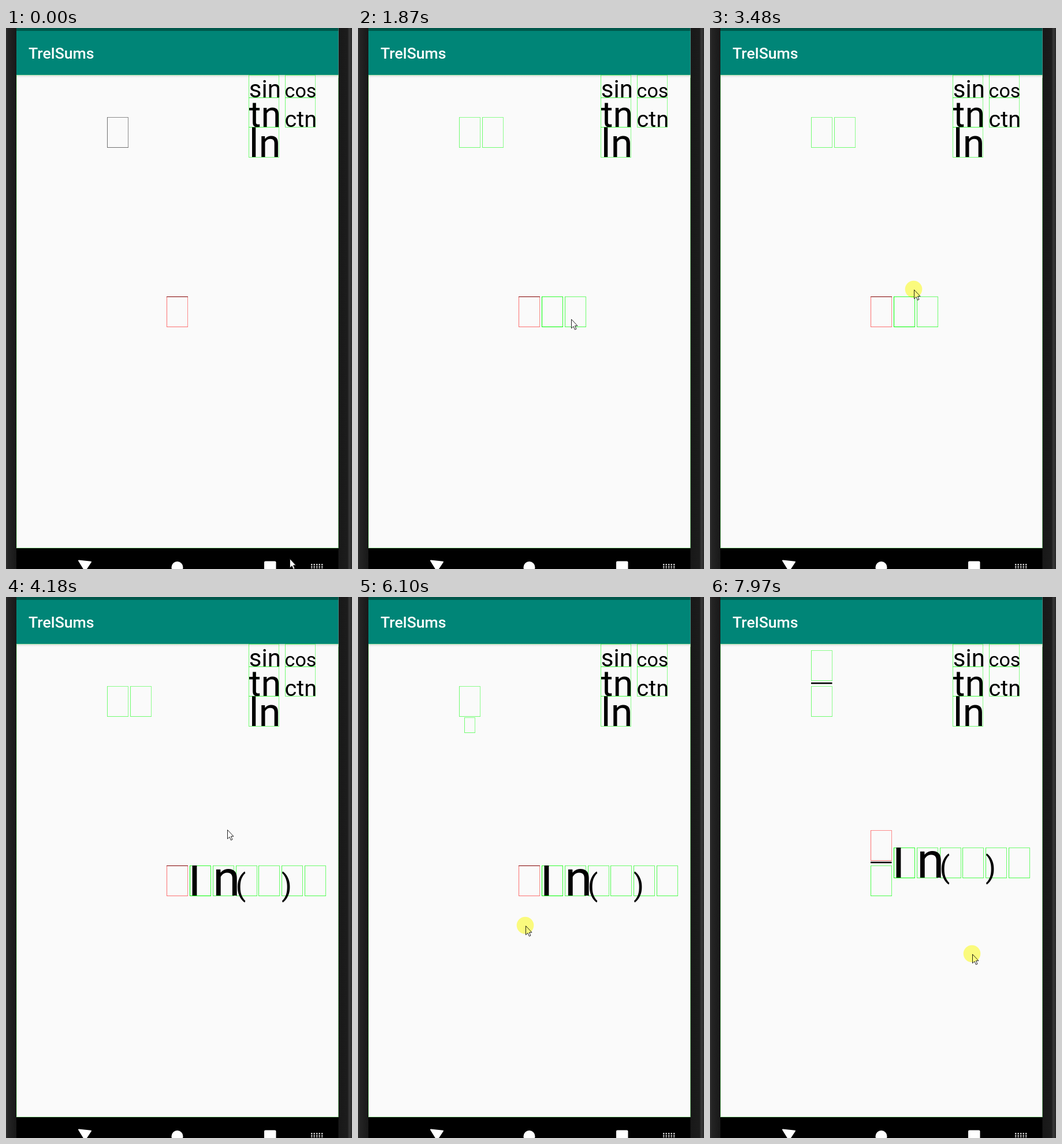
An HTML page that plays this animation: 599x935 px, repeating every 8 s.

```html
<!DOCTYPE html>
<html lang="en">
<head>
<meta charset="utf-8">
<title>TrelSums</title>
<style>
  html, body { margin: 0; width: 100%; height: 100%; overflow: hidden; background: #1a1a1a; }
  svg { display: block; width: 599px; height: 935px; font-family: Roboto, sans-serif; }
  #halo { fill: #ffff80; mix-blend-mode: multiply; }
</style>
</head>
<body>
<svg viewBox="0 0 599 935">
  <defs>
    <linearGradient id="left" x2="1" y2="0">
      <stop offset="0" stop-color="#303030"/><stop offset=".2" stop-color="#242424"/>
      <stop offset="1" stop-color="#181818"/>
    </linearGradient>
    <linearGradient id="right" x2="1" y2="0">
      <stop offset="0" stop-color="#181818"/><stop offset=".68" stop-color="#1c1c1c"/>
      <stop offset=".8" stop-color="#383838"/><stop offset="1" stop-color="#282828"/>
    </linearGradient>
    <linearGradient id="shade" x2="0" y2="1">
      <stop offset="0" stop-color="#d9d9d9"/><stop offset="1" stop-color="#fafafa"/>
    </linearGradient>
    <clipPath id="cell"><rect x="318" y="464" width="38" height="53"/></clipPath>
  </defs>

  <!-- phone -->
  <rect width="18" height="935" fill="url(#left)"/>
  <rect x="575" width="24" height="935" fill="url(#right)"/>
  <rect x="18" width="557.5" height="899" fill="#fafafa"/>
  <rect x="18" width="557.5" height="5" fill="#00574b"/>
  <rect x="18" y="5" width="557.5" height="76" fill="#008577"/>
  <rect x="18" y="81" width="557.5" height="5" fill="url(#shade)"/>
  <text x="39" y="53" font-size="26.7" font-weight="500" fill="#fff">TrelSums</text>
  <rect x="18" y="899" width="557.5" height="36" fill="#000"/>
  <g fill="#fff">
    <path d="M126 920.5L147 922.8L136.8 938Z" stroke="#fff" stroke-width="2" stroke-linejoin="round"/>
    <circle cx="296.5" cy="932" r="10"/>
    <rect x="447" y="921.5" width="20.5" height="20" rx="2"/>
    <path d="M528 927.5h21M528 931.5h21M528 935.5h21" stroke="#ddd" stroke-width="2.4" stroke-dasharray="2.4 2.1"/>
  </g>

  <g id="keys"></g>
  <g id="preview"></g>
  <g id="formula"></g>
  <g id="row">
    <g id="cells"></g>
    <g id="ln">
      <text x="316" y="516" font-size="86" clip-path="url(#cell)">l</text>
      <text x="358" y="516" font-size="86">n</text>
      <text x="397.5" y="516" font-size="52">(</text>
      <text x="477" y="516" font-size="52">)</text>
    </g>
  </g>

  <g id="mouse">
    <path d="M.5 .5V16L4 12.7L6.4 18.3L8.9 17.2L6.5 11.7H11Z" fill="#fff" stroke="#222"/>
    <circle id="halo" cx="-.5" cy="-.5" r="14.8"/>
  </g>
</svg>
<script>
const LOOP = 8000, STEP = 77.4, FIRST = 70;
const GREEN = '#0f0', RED = '#f00', W = 36, H = 52;
const $ = id => document.getElementById(id);
const timed = [];

function add(parent, tag, attrs = {}) {
  const el = document.createElementNS('http://www.w3.org/2000/svg', tag);
  for (const k in attrs) el.setAttribute(k, attrs[k]);
  return parent.appendChild(el);
}
const group = (parent, ...spans) => {
  const el = add(parent, 'g');
  timed.push([el, spans]);
  return el;
};

// a hairline box whose right and top edges are fainter
function box(parent, x, y, w, h, color = GREEN, ink = .55) {
  const line = (d, opacity) => add(parent, 'path', { d, stroke: color, opacity });
  line(`M${x} ${y + h + .5}h${w + 1}M${x + .5} ${y}v${h}`, ink);
  line(`M${x + 1} ${y + .5}h${w}M${x + w + .5} ${y + 1}v${h - 1}`, ink * .8);
}
const bar = (parent, x, y) => add(parent, 'rect', { x, y, width: 36.5, height: 2.6 });

// function keys: word, size, column, top, bottom
for (const [word, size, col, top, bottom] of [
  ['sin', 42, 0, 81, 120], ['cos', 34, 1, 81, 120],
  ['tn', 63, 0, 120, 171], ['ctn', 39.5, 1, 120, 171], ['ln', 69, 0, 171, 223]]) {
  box($('keys'), 420 + 63 * col, top, 52, bottom - top);
  add($('keys'), 'text', { x: 420.8 + 61.8 * col, y: bottom, 'font-size': size }).textContent = word;
}
box($('keys'), 18, 81, 557, 817, GREEN, .3);

// moments of the story
const PAIR = 1000, SECOND = 1090, THIRD = 1760, LN = 3770, INDEX = 6010, FRACTION = 6250, SPLIT = 6560;

// gesture preview
const single = group($('preview'), [0, PAIR]);
const pair = group($('preview'), [PAIR, INDEX]);
const index = group($('preview'), [INDEX, FRACTION], [7720, 7870]);
const fraction = group($('preview'), [FRACTION, 7720], [7870, LOOP]);
box(single, 175, 154, W, H, '#000');
box(pair, 175, 154, W, H);
box(pair, 215, 154, W, H);
box(index, 175, 154, W, H);
box(index, 184, 208, 18, 26);
box(fraction, 175, 92, W, H);
box(fraction, 175, 154, W, H);
bar(fraction, 175, 147.7);

// formula
const start = group($('formula'), [0, SPLIT]);
const split = group($('formula'), [SPLIT, LOOP]);
box(start, 278, 464, W, H, RED);
add(start, 'path', { d: 'M278 464.5h37', stroke: '#800000' });
box(split, 278, 403, W, H, RED);
box(split, 278, 464, W, H, GREEN, .7);
bar(split, 278, 457.5);

for (let i = 1; i <= 6; i++) {
  const cell = group($('cells'), [[SECOND, THIRD][i - 1] || LN, LOOP]);
  box(cell, Math.round(278.2 + 39.8 * i), 464, W, H, GREEN, i == 1 ? 1 : .7);
}
timed.push([$('ln'), [[LN, LOOP]]]);
timed.push([$('halo'), [[840, SECOND], [1380, THIRD], [3000, LN], [5930, SPLIT], [7490, LOOP]]]);

// pointer stops: time, x, y
const stops = [
  [FIRST, 491, 917], [850, 303, 505], [1110, 344, 516], [1240, 344, 516], [1700, 368, 506],
  [1780, 368, 506], [2900, 450, 202], [3020, 449, 202], [3480, 353, 452], [4020, 338, 510],
  [4400, 469, 197], [5000, 292, 495], [5250, 292, 495], [5560, 296, 479], [5940, 296, 479],
  [6100, 290, 568], [6490, 291, 612], [6650, 291, 597], [6880, 291, 597],
  [7300, 497, 500], [7510, 457, 480], [7960, 454, 617]
];

const ease = u => (1 - Math.cos(Math.PI * u)) / 2;

function pointAt(t) {
  const next = stops.findIndex(s => s[0] > t);
  if (next <= 0) return stops.at(next).slice(1);
  const [t0, x0, y0] = stops[next - 1], [t1, x1, y1] = stops[next];
  const k = ease((t - t0) / (t1 - t0));
  return [x0 + (x1 - x0) * k, y0 + (y1 - y0) * k].map(Math.round);
}

// the screen refreshes in even steps
const snap = t => Math.max(0, FIRST + STEP * Math.floor((t - FIRST) / STEP + .2));

function draw(now) {
  const t = snap(now % LOOP);
  for (const [el, spans] of timed)
    el.setAttribute('visibility', spans.some(([a, b]) => t >= a && t < b) ? 'visible' : 'hidden');
  $('row').setAttribute('transform', `translate(0 ${t >= SPLIT ? -31 : 0})`);
  $('mouse').setAttribute('transform', `translate(${pointAt(t)})`);
}

let begin;
function tick(now) {
  begin ??= now;
  draw(now - begin);
  requestAnimationFrame(tick);
}
draw(0);
requestAnimationFrame(tick);
</script>
</body>
</html>
```
